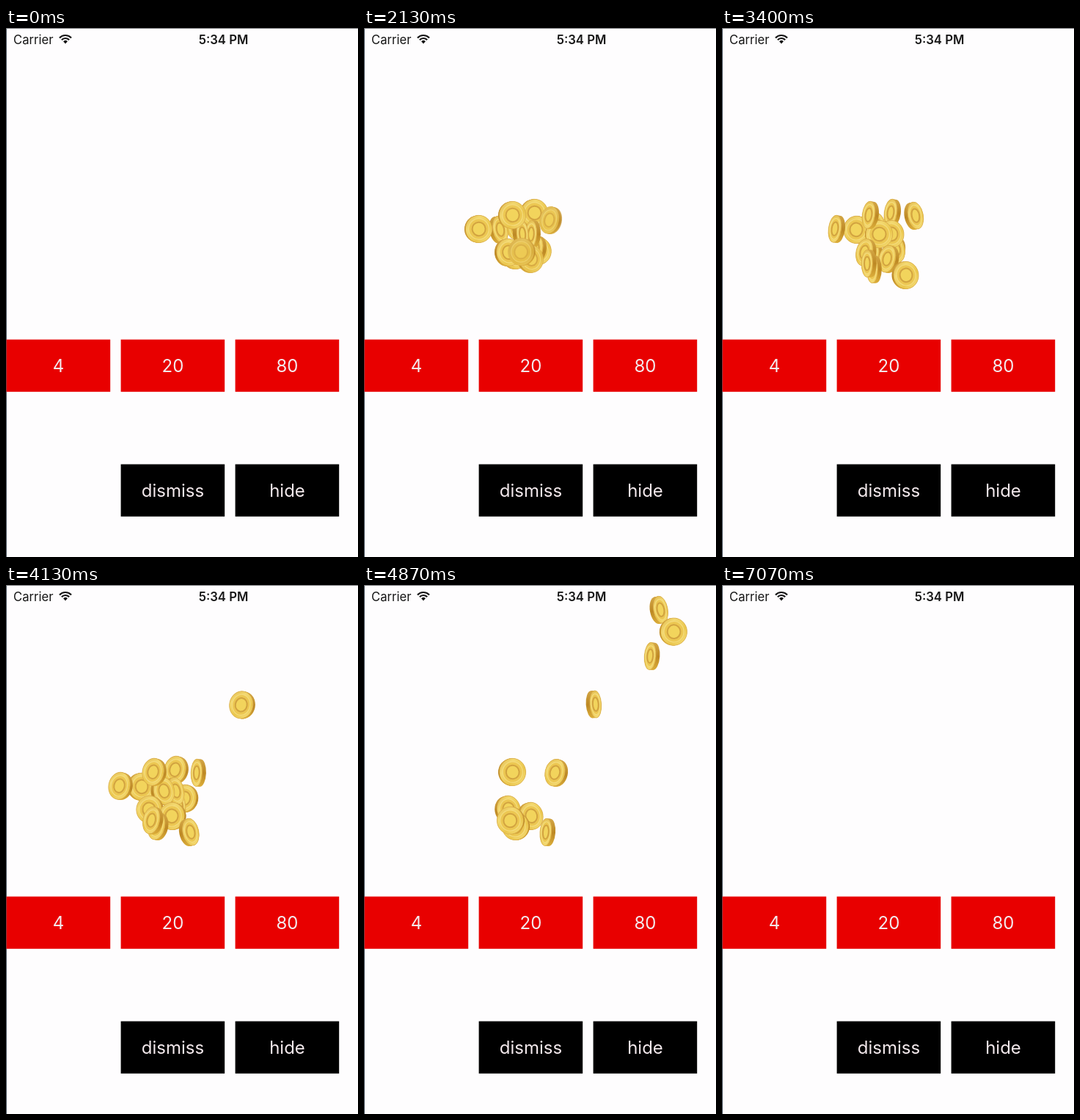
Write an HTML page with a canvas that moves like this. It is 480 px wide and 721 px high and loops after 7140 ms.

```html
<!DOCTYPE html>
<html>
<head>
<meta charset="utf-8">
<style>
  html, body { margin: 0; width: 100%; height: 100%; overflow: hidden; background: #fefdfe; }
  canvas { display: block; }
</style>
</head>
<body>
<canvas id="stage" width="480" height="721"></canvas>
<script>
const ctx = document.getElementById('stage').getContext('2d');
const LOOP = 7140, TAU = Math.PI * 2;
const SPIN = 228;
const POP = { start: 770, gap: 100, time: 280 };
const FLY = { start: 4030, gap: 94, time: 400 };
const SPAWN = [220, 290];
// Two control points and the end of the flight curve
const PATH = [[378, 50], [488, 88], [383, 21]];

// Resting place and spin phase of each coin, in order of appearance
const coins = [
  [206, 310, .65], [237, 304, .65], [210, 270, .3], [232, 252, .6],
  [235, 302, .25], [184, 275, .9], [156, 274, .6], [230, 281, .1],
  [214, 281, 0], [196, 306, .7], [202, 255, .6], [227, 315, .7],
  [262, 256, .32], [207, 329, .5], [250, 337, .1], [200, 321, .5]
];

const clamp = v => Math.max(0, Math.min(1, v));

function flightAt(from, axis, t) {
  const [a, b, c] = PATH.map(p => p[axis]), u = 1 - t;
  return u ** 3 * from + 3 * u * u * t * a + 3 * u * t * t * b + t ** 3 * c;
}

function ellipse(x, rx, ry, fill, stroke) {
  ctx.beginPath();
  ctx.ellipse(x, 0, rx, ry, 0, 0, TAU);
  if (fill) { ctx.fillStyle = fill; ctx.fill(); }
  if (stroke) { ctx.strokeStyle = stroke; ctx.stroke(); }
}

function drawCoin(x, y, phase, alpha) {
  const angle = phase * TAU;
  const squash = .74 + .26 * Math.cos(angle);
  const side = Math.sin(angle) < 0 ? 1 : -1;
  const depth = side * (1 + 5 * Math.sqrt(1 - squash * squash));
  const r = 18.6, w = r * squash - Math.abs(depth) / 4;

  ctx.save();
  ctx.translate(x, y);
  ctx.rotate(-.22 * Math.sin(angle));
  ctx.globalAlpha = alpha;

  const rim = ctx.createLinearGradient(0, -r, 0, r);
  rim.addColorStop(0, '#d3a645');
  rim.addColorStop(.5, '#bd8824');
  rim.addColorStop(1, '#dcae3a');
  for (let k = 1; k >= 0; k -= .2) ellipse(depth * (k - .4), w, r, rim);

  ctx.translate(-depth * .4, 0);
  const face = ctx.createLinearGradient(-w, -r, w, r);
  face.addColorStop(0, '#e0b74c');
  face.addColorStop(.3, '#f3d970');
  face.addColorStop(.65, '#ebc74d');
  face.addColorStop(1, '#f8e283');
  ctx.lineWidth = .8;
  ellipse(0, w, r, face, '#dcb04c');
  ctx.lineWidth = 1.2;
  ellipse(0, w * .76, r * .76, '#ecc752', '#f4dc7e');
  ctx.lineWidth = 2;
  ellipse(0, w * .5, r * .5, '#f2d45c', '#d2a340');
  ctx.restore();
}

function drawButton(x, y, label, fill) {
  ctx.fillStyle = fill;
  ctx.fillRect(x - .4, y - .4, 141.6, 71.2);
  ctx.fillStyle = '#f3e9ec';
  ctx.font = '400 24px Inter, sans-serif';
  ctx.textAlign = 'center';
  ctx.fillText(label, x + 70.5, y + 44);
}

function drawScreen() {
  ctx.fillStyle = '#fefdfe';
  ctx.fillRect(0, 0, 480, 721);
  ctx.fillStyle = '#4c5662';
  ctx.fillRect(0, 0, 1, 721);
  ctx.fillStyle = '#77777b';
  ctx.fillRect(0, 0, 480, 1);

  ctx.fillStyle = '#161616';
  ctx.textAlign = 'left';
  ctx.font = '400 16.7px Inter, sans-serif';
  ctx.fillText('Carrier', 10, 22);
  ctx.textAlign = 'center';
  ctx.font = '600 16.7px Inter, sans-serif';
  ctx.fillText('5:34 PM', 296.5, 22);

  ctx.strokeStyle = '#161616';
  ctx.lineWidth = 2.2;
  for (const r of [7, 11]) {
    ctx.beginPath();
    ctx.arc(81, 21, r, -Math.PI * .76, -Math.PI * .24);
    ctx.stroke();
  }
  ctx.beginPath();
  ctx.moveTo(81, 21.5);
  ctx.arc(81, 21, 4, -Math.PI * .76, -Math.PI * .24);
  ctx.fill();

  ['4', '20', '80'].forEach((label, i) =>
    drawButton(1 + i * 156, 425, label, '#e80000'));
  drawButton(157, 595, 'dismiss', '#000');
  drawButton(313, 595, 'hide', '#000');
}

function draw(now) {
  const t = now % LOOP;
  drawScreen();
  coins.forEach(([x, y, phase], i) => {
    const age = t - POP.start - i * POP.gap;
    const flight = (t - FLY.start - i * FLY.gap) / FLY.time;
    if (age < 0 || flight > 1) return;
    const out = 1 - (1 - clamp(age / POP.time)) ** 2;
    const f = clamp(flight);
    const px = SPAWN[0] + (x - SPAWN[0]) * out;
    const py = SPAWN[1] + (y - SPAWN[1]) * out;
    drawCoin(
      flightAt(px, 0, f),
      flightAt(py, 1, f),
      (t - 3400) / SPIN + phase,
      clamp(.5 + age / 800)
    );
  });
  requestAnimationFrame(() => draw(performance.now()));
}
draw(0);
</script>
</body>
</html>
```
